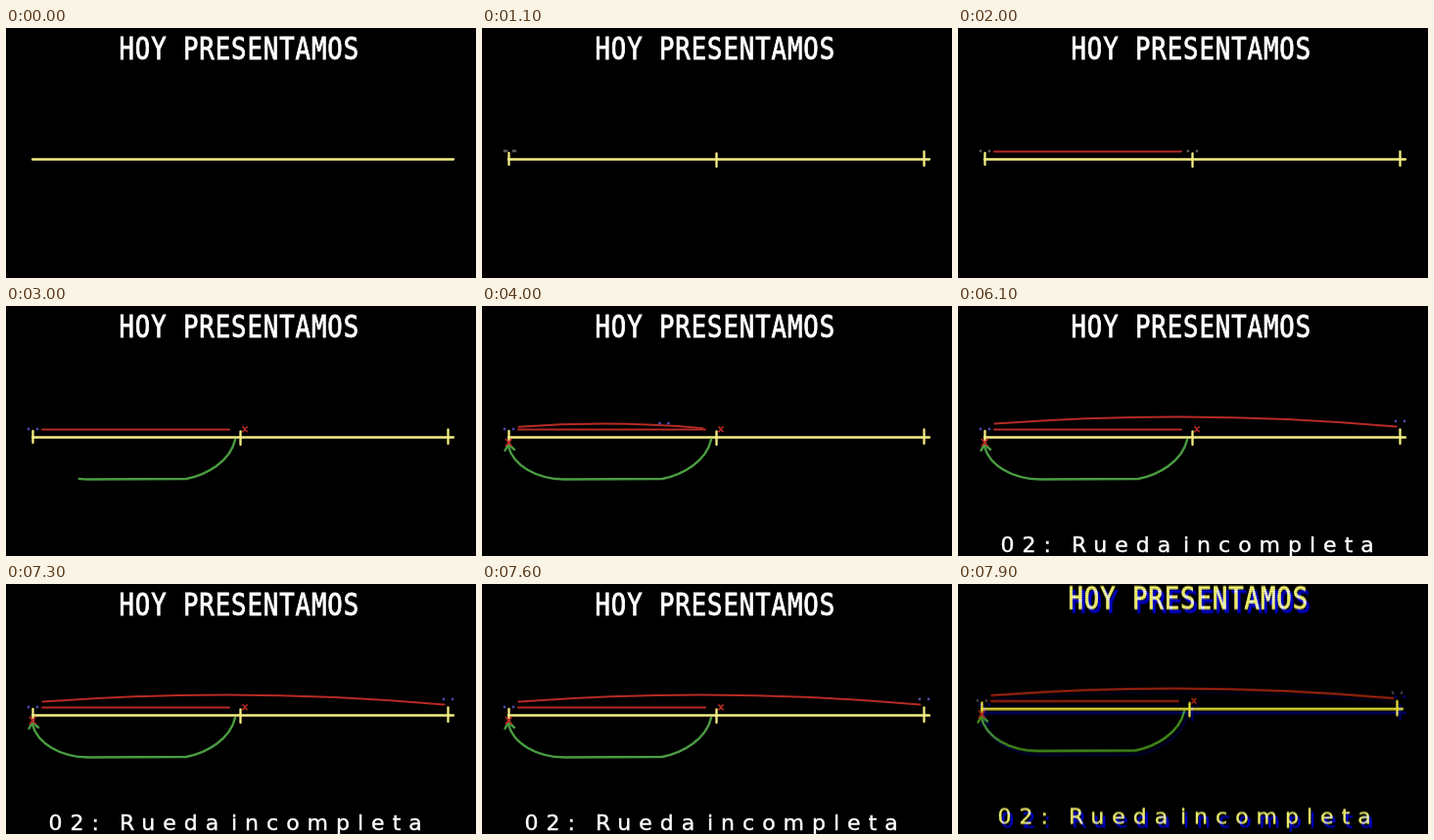
These frames come from a looping animation (480x256 px, 8 s). An HTML page:

```html
<!DOCTYPE html>
<html lang="es">
<head>
<meta charset="utf-8">
<title>Hoy presentamos</title>
<style>
  html, body { margin: 0; width: 100%; height: 100%; overflow: hidden; background: #000; }
  svg { display: block; width: 100%; height: 100%; }
  text { fill: #fff; stroke: #fff; white-space: pre; }
  .title { font: 32px "DejaVu Sans Mono", monospace; letter-spacing: 1.2px; stroke-width: .9; }
  .sub { font: 22px "DejaVu Sans", sans-serif; letter-spacing: 8px; stroke-width: .4; }
  path { fill: none; stroke-linecap: round; stroke-linejoin: round; stroke-width: 2; }
  .axis { stroke: #f4ee84; stroke-width: 2.3; }
  .trip { stroke: #b62a26; }
  .back { stroke: #4a9c42; stroke-width: 2.4; }
  .cross { stroke: #b82a26; stroke-width: 1.8; }
</style>
</head>
<body>
<svg viewBox="0 0 480 256">
  <defs>
    <filter id="split" filterUnits="userSpaceOnUse" x="-20" y="-20" width="520" height="300" color-interpolation-filters="sRGB">
      <feGaussianBlur in="SourceGraphic" stdDeviation=".5" result="soft"/>
      <feColorMatrix in="soft" values="1 0 0 0 0  0 1 0 0 0  0 0 .45 0 0  0 0 0 1 0" result="warm"/>
      <feColorMatrix in="soft" values="0 0 0 0 0  0 0 0 0 0  0 0 .8 0 0  0 0 0 1 0"/>
      <feOffset id="blue" result="cold"/>
      <feBlend in="warm" in2="cold" mode="screen"/>
    </filter>
    <pattern id="scan" width="4" height="2" patternUnits="userSpaceOnUse">
      <rect width="4" height="1" opacity=".15"/>
    </pattern>
    <g id="pair"><circle cx="-4.5" r="1.4"/><circle cx="4.5" r="1.4"/></g>
  </defs>
  <rect width="480" height="256"/>
  <g id="scene">
    <text class="title" transform="translate(115.500 31.500) scale(.8 1)">HOY PRESENTAMOS</text>
    <path class="back" id="loop" pathLength="1" stroke-dasharray="1 2" d="M234 137C229 159 205 173 184 177L84 177.500C55 177 32 163 27 144"/>
    <path class="back" id="head" d="M23.500 148L27 141.500L33 147"/>
    <path class="trip" id="first"/>
    <path class="trip" id="second"/>
    <path class="axis" d="M27 134.500H457"/>
    <path class="axis" id="tick0" d="M27.500 128V140"/>
    <path class="axis" id="tick1" d="M239.500 128.500V142"/>
    <path class="axis" id="tick2" d="M451.500 126.500V141"/>
    <path class="cross" id="crossA" d="M242 124L246 128.500M246 124L242 128.500"/>
    <path class="cross" id="crossB" d="M24.500 136.500L30 143M30 136.500L24.500 143"/>
    <use href="#pair" id="home"/>
    <use href="#pair" id="walker"/>
    <text class="sub" id="sub" y="252"><tspan x="43.500">02:</tspan> <tspan x="116">Rueda</tspan> <tspan x="230">incompleta</tspan></text>
  </g>
  <rect id="lines" width="480" height="256" fill="url(#scan)"/>
</svg>
<script>
  const LOOP = 8000;
  const $ = id => document.getElementById(id);
  const set = (id, attrs) => { for (const k in attrs) $(id).setAttribute(k, attrs[k]); };
  const show = (id, on) => set(id, { visibility: on ? 'visible' : 'hidden' });
  const ramp = (t, a, b) => Math.min(1, Math.max(0, (t - a) / (b - a)));
  const ease = (t, a, b) => { const u = ramp(t, a, b); return u * u * (3 - 2 * u); };
  const at = (id, x, y) => set(id, { transform: `translate(${x} ${y})` });

  // Per step: scene dx, dy, then blue-channel dx, dy
  const shakes = [[1, -3, 1, 2], [-4, -5, 2, 3], [-3, -6.5, 2.5, 4]];

  function drawAxis(t) {
    [100, 200, 300].forEach((start, i) => show('tick' + i, t >= start));
  }

  function drawTrips(t) {
    const out = ease(t, 1050, 1950);
    show('first', out > .02);
    set('first', { d: `M37 126.5H${37 + 191 * out}` });

    const back = ease(t, 2500, 3250);
    show('loop', back > 0);
    set('loop', { 'stroke-dashoffset': 1 - back });
    show('head', back === 1);
    show('crossA', t >= 2300);
    show('crossB', t >= 3250);

    const k = ease(t, 3340, 4740);
    show('second', k > .01);
    set('second', {
      d: `M37.5 ${126.5 - 6 * k}Q${37.5 + 205 * k} ${126.5 - 21.5 * k} ${37.5 + 410 * k} ${126.5 - 3 * k}`
    });
  }

  function drawPairs(t) {
    const color = t < 2300 ? '#575b61' : '#4a48a8';
    const enter = ease(t, 600, 1000);
    const again = ease(t, 3420, 4820);
    set('home', { fill: color });
    set('walker', { fill: color });
    show('home', t >= 600);
    at('home', -8 + 35.5 * enter, 126);
    show('walker', (t >= 1050 && t < 2300) || t >= 3420);
    if (t < 2300) at('walker', 27.5 + 212 * ease(t, 1050, 1950), 126);
    else at('walker', 27.5 + 424 * again, 126 - 8 * again - 12 * again * (1 - again));
  }

  function drawGlitch(t) {
    const shake = shakes[Math.floor((t - 7700) / 100)];
    show('lines', shake);
    if (!shake) {
      $('scene').removeAttribute('filter');
      at('scene', 0, 0);
      return;
    }
    const [x, y, dx, dy] = shake;
    at('scene', x, y);
    set('blue', { dx, dy });
    set('scene', { filter: 'url(#split)' });
  }

  function draw(t) {
    drawAxis(t);
    drawTrips(t);
    drawPairs(t);
    set('sub', { opacity: ramp(t, 4750, 6000) });
    drawGlitch(t);
  }

  const begin = performance.now();
  function tick() {
    draw((performance.now() - begin) % LOOP);
    requestAnimationFrame(tick);
  }
  tick();
</script>
</body>
</html>
```
